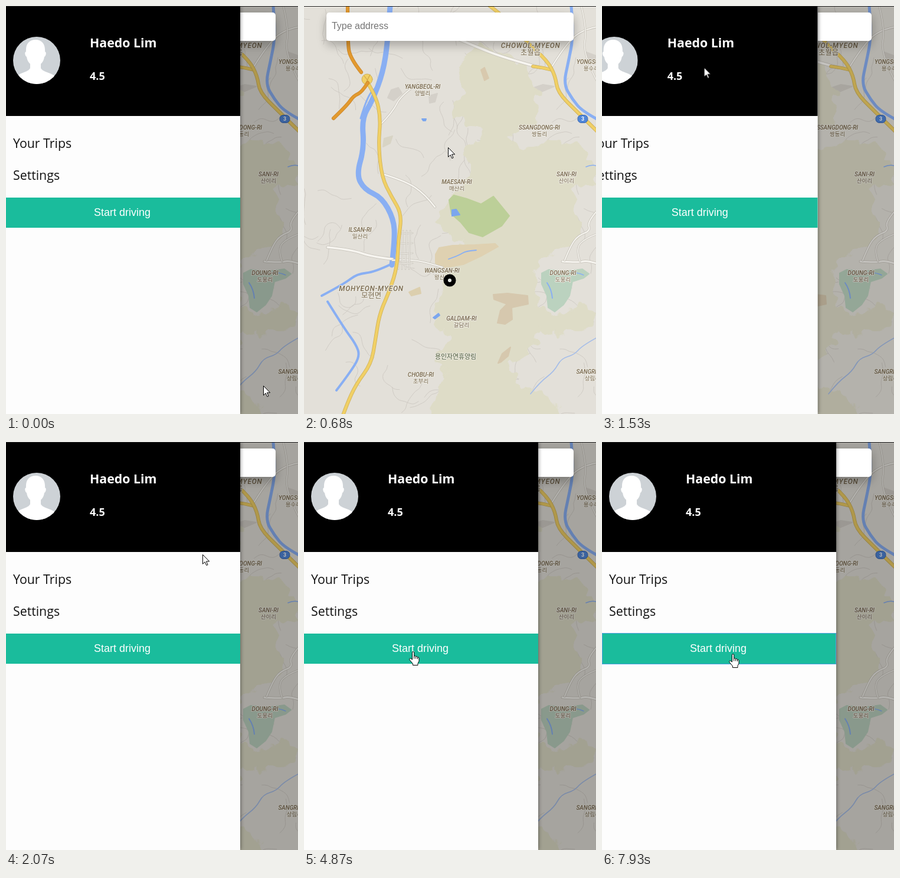
An HTML page that plays this animation: 495x690 px, repeating every 8 s.

```html
<!DOCTYPE html>
<html lang="en">
<head>
<meta charset="utf-8">
<title>Driver menu</title>
<style>
  html, body { margin: 0; width: 100%; height: 100%; overflow: hidden; background: #e3e0d9; }
  #stage { position: relative; width: 495px; height: 690px; overflow: hidden; --t: 0; }
  #stage > * { position: absolute; left: 0; top: 0; }
  .anim {
    animation: 8s linear infinite paused;
    animation-delay: calc(var(--t) * -1ms);
  }
  #map text { text-anchor: middle; paint-order: stroke; stroke: #eceae2; stroke-width: 2px; stroke-linejoin: round; fill: #7a6a50; }
  #map .en { font: italic 500 10px Roboto, sans-serif; }
  #map .ko { font: 9.6px "Noto Sans CJK KR", "Noto Sans CJK", sans-serif; }
  #map .town.en { font-size: 12px; letter-spacing: .7px; }
  #map .town.ko { font-size: 12.3px; }
  #map .park { font-size: 10.9px; fill: #4b5a38; }
  #map .shield { font: bold 9px Roboto, sans-serif; fill: #fff; stroke: none; }

  #shade { width: 495px; height: 690px; background: #000; opacity: .27; animation-name: shade; }
  #stage > #search {
    left: 38px; top: 11px; width: 419px; height: 48px; border-radius: 5px; background: #fff;
    box-shadow: 0 8px 17px rgba(0, 0, 0, .18), 0 5px 18px rgba(0, 0, 0, .12);
    font: 16px/46px "Liberation Sans", Arial, sans-serif; color: #757575;
  }
  #search span { position: absolute; right: 314px; white-space: nowrap; }

  #drawer { width: 397px; height: 690px; background: #fdfdfd; box-shadow: 1px 0 6px rgba(0, 0, 0, .4); animation-name: drawer; }
  #drawer svg { position: absolute; left: 0; top: 0; }
  #drawer text { font: 21.33px "Open Sans", "Noto Sans", sans-serif; fill: #111; }
  #drawer .bold { font-weight: 700; fill: #fff; }
  #drawer .rating { font-size: 18px; }
  #drawer .action { font: 18px "Liberation Sans", Arial, sans-serif; fill: #fff; text-anchor: middle; }
  #focus { animation-name: focus; animation-timing-function: step-end; }

  #pointer { overflow: visible; animation-name: move; }
  #arrow { animation-name: arrow; animation-timing-function: step-end; }
  #hand { animation-name: hand; animation-timing-function: step-end; }
  #edge { width: 495px; height: 1px; background: #262626; }

  @keyframes drawer {
    0%, 6.2125% { transform: none; animation-timing-function: cubic-bezier(.33, 1, .68, 1); }
    8.7125%, 16.994% { transform: translateX(-407px); animation-timing-function: cubic-bezier(.33, 1, .68, 1); }
    20.744%, 100% { transform: none; }
  }
  @keyframes shade {
    0%, 6.2125% { opacity: .27; animation-timing-function: cubic-bezier(.33, 1, .68, 1); }
    8.7125%, 16.994% { opacity: 0; animation-timing-function: ease-out; }
    20.744%, 100% { opacity: .27; }
  }
  @keyframes focus { 0% { opacity: 0; } 78.5%, 100% { opacity: 1; } }
  @keyframes arrow { 0% { opacity: 1; } 34.4%, 100% { opacity: 0; } }
  @keyframes hand {
    0% { opacity: 0; }
    34.4% { opacity: 1; }
    81.5% { opacity: 0; }
    90.25%, 100% { opacity: 1; }
  }
  @keyframes move {
    0% { transform: translate(436px, 642px); }
    5.75%, 10.55% { transform: translate(244px, 239px); }
    16.25%, 17.25% { transform: translate(17px, 27px); }
    21.08% { transform: translate(328px, 180px); }
    24%, 24.92% { transform: translate(329px, 185px); }
    25.875% { transform: translate(333px, 190px); }
    28.75% { transform: translate(375px, 215px); }
    30.6% { transform: translate(400px, 270px); }
    31.6% { transform: translate(398px, 315px); }
    32.75% { transform: translate(370px, 372px); }
    33.75% { transform: translate(325px, 378px); }
    35.45% { transform: translate(255px, 369px); }
    36.41%, 39.4% { transform: translate(248px, 363px); }
    45.375%, 59.8% { transform: translate(198px, 354px); }
    60.875%, 77.61% { transform: translate(178px, 354px); }
    77.62% { transform: translate(173px, 341px); }
    79.5%, 90.24% { transform: translate(170px, 328px); }
    90.25% { transform: translate(171px, 337px); }
    93.25%, 99.12% { transform: translate(177px, 349px); }
    99.125%, 100% { transform: translate(215px, 358px); }
  }
</style>
</head>
<body>
<div id="stage">
  <svg id="map" width="495" height="690" viewBox="0 0 495 690">
    <defs>
      <filter id="ragged" x="-5%" y="-5%" width="110%" height="110%">
        <feTurbulence type="fractalNoise" baseFrequency=".045" numOctaves="2" seed="4"/>
        <feDisplacementMap in="SourceGraphic" scale="28" xChannelSelector="R" yChannelSelector="G"/>
      </filter>
    </defs>
    <rect width="495" height="690" fill="#e3e0d9"/>
    <g id="land"></g>
    <g id="roads" fill="none" stroke-linecap="round" stroke-linejoin="round"></g>
    <g id="labels"></g>
    <rect x="464" y="184.500" width="17" height="13" rx="6" fill="#4f86d9" stroke="#3c68b0"/>
    <text class="shield" x="472.500" y="194.300">3</text>
    <circle cx="247" cy="464" r="6.800" fill="#e9ece6" stroke="#000" stroke-width="7.500"/>
  </svg>
  <div id="shade" class="anim"></div>
  <div id="search"><span>Type address</span></div>
  <div id="drawer" class="anim">
    <svg width="397" height="690">
      <defs><clipPath id="round"><circle cx="52" cy="92" r="40"/></clipPath></defs>
      <rect width="397" height="186"/>
      <g clip-path="url(#round)">
        <rect x="12" y="52" width="80" height="80" fill="#cdd2d6"/>
        <path fill="#fff" d="M50 57c11 0 17 8 16 20 3 1 2 7-1 9-1 6-3 9-6 12v7c3 7 20 8 25 15l3 14H14l3-14c5-7 21-8 24-15v-7c-3-3-5-6-6-12-3-2-4-8-1-9-1-12 5-20 16-20z"/>
      </g>
      <text class="bold" x="142" y="70">Haedo Lim</text>
      <text class="bold rating" x="142" y="125">4.5</text>
      <text x="12" y="240">Your Trips</text>
      <text x="12" y="294">Settings</text>
      <rect y="324" width="397" height="51" fill="#1abc9c"/>
      <rect id="focus" class="anim" x=".5" y="323.500" width="396" height="52" fill="none" stroke="#4f9fe0"/>
      <text class="action" x="197" y="355">Start driving</text>
    </svg>
  </div>
  <svg id="pointer" class="anim" width="20" height="25" stroke="#000" fill="#fff" stroke-linejoin="round">
    <path id="arrow" class="anim" d="M.5.5v15.800l3.600-3.500 2.700 5.800 2.300-1-2.600-5.700h5.200z"/>
    <g id="hand" class="anim">
      <path d="M5.500 14V2.200a1.600 1.600 0 0 1 3.200 0V8q1.700-1 3 .7 1.800-.6 2.800 1 2-.2 2.500 2v4.800l-2 4v3H6.500v-2.500L1.300 14.800c-1.500-2.300.8-3.800 2.400-2.200z"/>
      <path fill="none" d="M8.700 8v4.500M11.700 9v3.500M14.500 10v3"/>
    </g>
  </svg>
  <div id="edge"></div>
</div>
<script>
  const $ = id => document.getElementById(id);
  const pairs = s => s.split(' ').map(p => p.split(',').map(Number));

  function add(parent, tag, attrs, text) {
    const el = document.createElementNS('http://www.w3.org/2000/svg', tag);
    for (const k in attrs) el.setAttribute(k, attrs[k]);
    if (text) el.textContent = text;
    return $(parent).appendChild(el);
  }

  // Smooth open curve through the midpoints of the given points
  function curve(p) {
    let d = 'M' + p[0];
    for (let i = 1; i < p.length - 1; i++) {
      const [x, y] = p[i], [u, v] = p[i + 1];
      d += i < p.length - 2 ? `Q${x},${y} ${(x + u) / 2},${(y + v) / 2}` : `Q${x},${y} ${u},${v}`;
    }
    return p.length < 3 ? d + 'L' + p[1] : d;
  }

  const area = (s, fill, extra) => add('land', 'path', { d: 'M' + s + 'z', fill, stroke: fill, 'stroke-width': 2, 'stroke-linejoin': 'round', ...extra });
  function road(s, color, width, casing) {
    const d = curve(pairs(s));
    if (casing) add('roads', 'path', { d, stroke: casing, 'stroke-width': width + 1.6 });
    add('roads', 'path', { d, stroke: color, 'stroke-width': width });
  }

  // Lanes: seeded wandering lines
  let seed = 11;
  const rnd = () => (seed = seed * 16807 % 2147483647) / 2147483647;
  let lanes = '';
  for (let i = 0; i < 120; i++) {
    let x = rnd() * 495, y = rnd() * 690, a = rnd() * 6.28;
    const walk = [];
    for (let j = 0; j < 8; j++) {
      walk.push([x.toFixed(1), y.toFixed(1)].map(Number));
      a += (rnd() - .5) * 1.7;
      x += Math.cos(a) * 9;
      y += Math.sin(a) * 9;
    }
    lanes += curve(walk);
  }
  add('land', 'path', { d: lanes, fill: 'none', stroke: '#cdc9c2', 'stroke-width': .9 });

  const town = '#d4d0c9';
  area('148,142 160,138 166,148 152,160 142,155', town);
  area('212,152 226,148 222,162 213,164', town);
  area('136,224 150,220 146,232 134,238', '#d8d4c5');
  area('384,140 405,133 424,136 400,146', town);
  area('478,78 495,84 495,98 482,92', town);
  area('178,484 196,476 198,486 182,490', '#dccfae');

  area('262,98 292,70 345,78 380,112 398,160 392,205 345,222 365,245 420,230 462,232 490,262 495,300 448,308 462,355 472,385 430,415 398,437 390,470 400,512 420,520 470,508 492,520 488,540 430,556 398,545 392,570 350,605 362,640 400,655 425,675 432,710 215,710 226,655 245,625 222,600 245,560 218,525 232,480 245,445 270,400 225,370 240,345 250,320 285,290 270,250 300,215 250,185 270,150',
    '#dedcc7', { filter: 'url(#ragged)' });
  area('246,328 254,320 276,326 300,335 321,322 348,355 335,372 303,390 280,383 266,366 250,352', '#bccf98');
  area('223,420 229,409 252,405 290,404 324,402 329,407 302,422 270,437 236,443 223,435', '#dfd1b1');
  area('403,452 415,446 442,449 472,445 483,453 474,460 455,466 450,490 440,505 425,517 414,510 412,490 403,470', '#bbd2bf');
  area('321,488 345,486 379,490 380,504 352,510 353,530 341,538 328,536 333,515 344,504 322,496', '#d6c8ae');
  area('329,604 336,588 350,577 346,592 334,602', '#d6c8ae');
  area('300,108 306,104 313,122 306,126', '#d8c9ae');
  area('251,345 258,344 264,353 251,355', '#7ba6ee');
  area('219,527 228,520 230,523 222,529', '#7ba6ee');
  area('200,191 207,191 206,194 202,194', '#7ba6ee');

  const water = '#89aff3', white = '#f7f5f0', grey = '#c6c2b9', yellow = '#f1d065', gold = '#cdb05a';
  road('146,0 142,60 134,112 116,160 98,190 102,240 89,285 102,310 132,324 152,360 154,395 149,438', water, 9);
  road('137,105 124,138 108,150 96,190', water, 3);
  road('149,436 120,450 90,453 68,470 30,490', water, 4);
  road('40,500 68,545 88,572 95,592 78,620 55,650', water, 4);
  road('453,0 457,50 448,95 440,132 455,158 472,178 498,192', water, 5);
  road('498,560 472,574 458,590 436,596 424,618 400,636 384,656', '#a5bde8', 1.6);
  road('412,468 420,480 421,494', water, 2);
  road('440,452 458,448 474,455', water, 1.5);
  road('245,428 262,422 275,414 292,413', water, 1.8);
  road('478,272 487,268 495,270', water, 1.5);

  road('238,46 285,66 340,88 400,104', white, 4, grey);
  road('133,284 172,296 205,318 222,340', white, 2.5, grey);
  road('130,200 150,180 165,150 195,130', white, 2, grey);
  road('40,408 80,412 115,424 150,428', white, 3.5, grey);
  road('150,430 175,428 210,434 235,442', white, 2, grey);
  for (let i = 0; i < 4; i++) {
    road(`${162 + i * 6},380 ${160 + i * 6},445`, white, 1, grey);
    road(`160,${385 + i * 17} 184,${384 + i * 17}`, white, 1, grey);
  }
  road('438,432 465,434 480,430 498,436', white, 3, grey);
  road('442,430 452,405 465,388 486,380 480,365 498,345', white, 2, grey);
  road('468,432 460,410 478,392 498,385', white, 1.5, grey);
  road('418,106 440,70 470,40 498,35', white, 2, grey);
  road('470,0 480,40 472,80 498,130', white, 1.5, grey);

  road('388,102 405,104 420,108', yellow, 4, gold);
  road('310,-4 352,28 378,62 412,92 426,118 430,146 462,178 498,213', yellow, 4.5, gold);
  road('105,125 122,152 130,190 126,235 132,290 148,322 166,352 160,395 158,440 146,480 128,520 121,565 114,605 88,640 72,675 64,698', yellow, 4.5, gold);
  add('roads', 'circle', { cx: 107, cy: 124, r: 9, fill: yellow, stroke: gold });
  add('roads', 'path', { d: 'M102 118l9 12M112 116l-8 16', stroke: '#c99a3a', 'stroke-width': 1 });
  road('74,-4 74,60 78,88 97,112', '#e39a2e', 4.5, '#c9842a');
  road('108,130 98,146 84,152 73,168 50,190', '#e39a2e', 4.5, '#c9842a');

  const places = [
    ['YANGBEOL-RI', '양벌리', 201, 140], ['SSANGDONG-RI', '쌍동리', 399, 209],
    ['SANI-RI', '산이리', 445, 288], ['MAESAN-RI', '매산리', 259, 301],
    ['ILSAN-RI', '일산리', 95, 382], ['WANGSAN-RI', '왕산리', 234, 451],
    ['DOUNG-RI', '도웅리', 439, 455], ['GALDAM-RI', '갈담리', 267, 532],
    ['CHOBU-RI', '초부리', 198, 627], ['SANGRIM-RI', '상림리', 489, 622],
    ['YONGSU-RI', '용수리', 487, 98],
    ['CHOWOL-MYEON', '초월읍', 384, 71, 'town'], ['MOHYEON-MYEON', '모현면', 114, 482, 'town']
  ];
  for (const [en, ko, x, y, kind = ''] of places) {
    add('labels', 'text', { class: 'en ' + kind, x, y }, en);
    add('labels', 'text', { class: 'ko ' + kind, x, y: y + (kind ? 12 : 10.5) }, ko);
  }
  add('labels', 'text', { class: 'ko park', x: 257, y: 596.5 }, '용인자연휴양림');

  const STEP = 230 / 3;
  function tick() {
    const t = performance.now() % 8000;
    const shown = t < 3000 ? Math.floor((t + 10.5) / STEP) * STEP : t;
    $('stage').style.setProperty('--t', shown.toFixed(2));
    requestAnimationFrame(tick);
  }
  tick();
</script>
</body>
</html>
```
